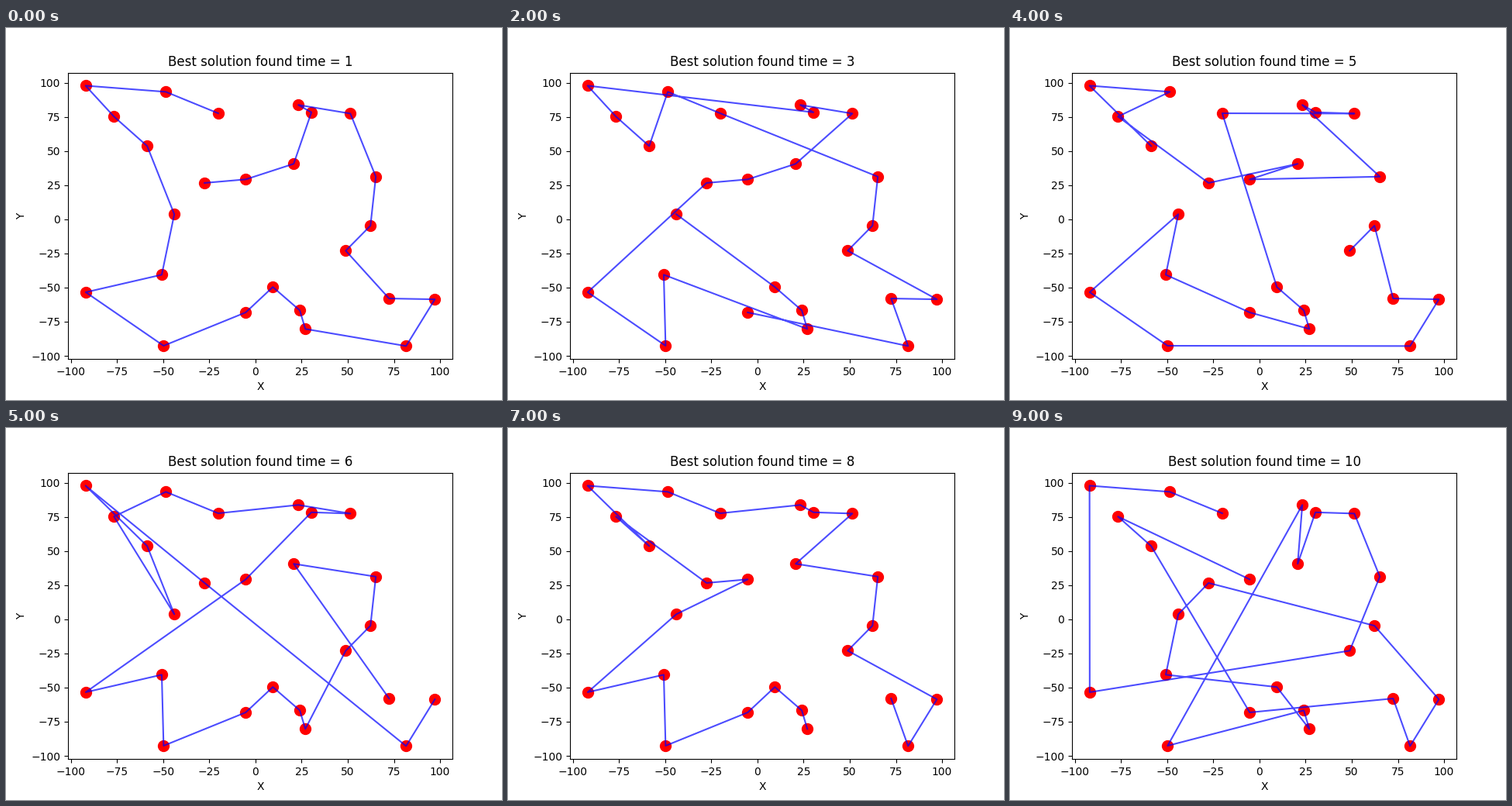
These frames come from a looping animation (640x480 px, 10000 ms). A matplotlib script:

```python
import matplotlib.pyplot as plt
from matplotlib.animation import FuncAnimation

# Stops named a..y
STOPS = dict(
    a=(-20.2, 77.6), b=(-48.6, 93.3), c=(-92.1, 97.8), d=(-76.7, 75.2),
    e=(-58.7, 53.6), f=(-44.0, 3.7), g=(-50.8, -40.6), h=(-92.0, -53.4),
    i=(-49.8, -92.6), j=(-5.3, -68.2), k=(9.4, -49.6), l=(24.0, -66.7),
    m=(27.0, -80.3), n=(81.6, -92.8), o=(97.2, -58.6), p=(72.4, -58.0),
    q=(48.9, -23.0), r=(62.3, -4.7), s=(65.2, 31.2), t=(51.4, 77.4),
    u=(23.2, 83.7), v=(30.3, 78.3), w=(20.7, 40.6), x=(-5.3, 29.2),
    y=(-27.6, 26.6),
)

# Visiting order of each solution
TOURS = [
    "abcdefghijklmnopqrstuvwxy",
    "nposrqlmkjighfyxwtvuabcde",
    "jnpoqrsabedcvutwxyhigmlkf",
    "onpqrsvtuwxabecdyfghijklm",
    "ecbdywxsuvtaklmjgfhinoprq",
    "onycefdbautvxhgijklmqrswp",
    "tqijkhfgcdebuvayxwrsmlpon",
    "pnoqrswtvuabcedyxfhgijklm",
    "edcgkjmlqrtvuabwxyfhinpos",
    "abchqstvwuilmkgfyronpjedx",
]

fig, ax = plt.subplots(figsize=(6.4, 4.8), dpi=100)
ax.scatter(*zip(*STOPS.values()), color="red", s=100)
path, = ax.plot([], [], color="blue", alpha=0.7, linewidth=1.5)
title = ax.set_title("")
ax.set_xlabel("X")
ax.set_ylabel("Y")
ax.set_xlim(-101.6, 106.7)
ax.set_ylim(-102.35, 107.35)


def draw(frame):
    path.set_data(*zip(*(STOPS[name] for name in TOURS[frame])))
    title.set_text(f"Best solution found time = {frame + 1}")
    return path, title


anim = FuncAnimation(fig, draw, frames=len(TOURS), interval=1000,
                     repeat=True, repeat_delay=0, blit=False)
plt.show()
```
